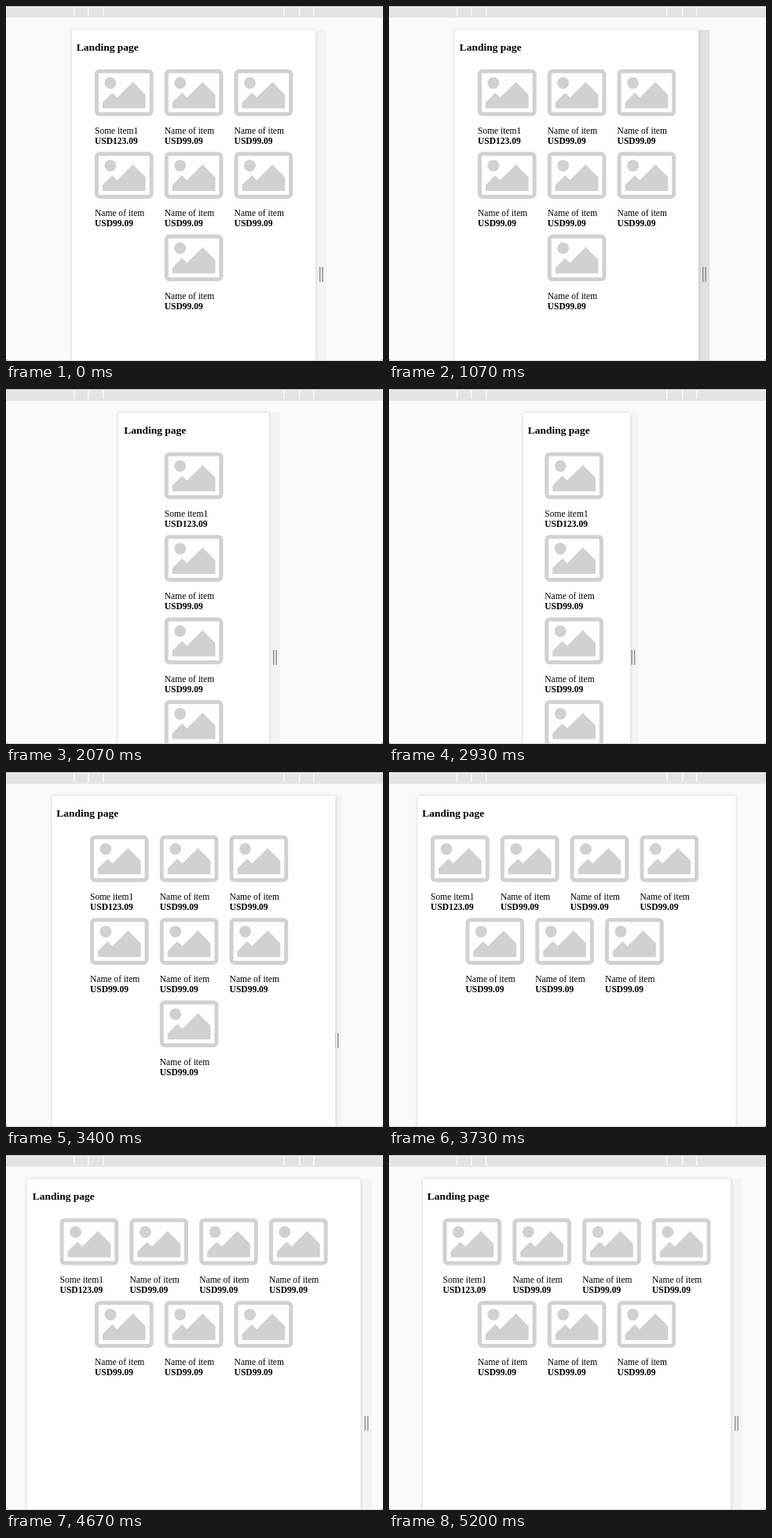
An HTML page with a canvas that plays this animation: 480x453 px, repeating every 5870 ms.

```html
<!DOCTYPE html>
<html lang="en">
<head>
<meta charset="utf-8">
<title>Responsive landing page</title>
<style>
  html, body { margin: 0; width: 100%; height: 100%; overflow: hidden; background: #faf9fb; }
  canvas { display: block; }
</style>
</head>
<body>
<canvas id="stage" width="480" height="453"></canvas>
<script>
const ctx = document.getElementById('stage').getContext('2d');
const STAGE_W = 480, STAGE_H = 453;
const LOOP = 5870, STEP = 1000 / 15;
const CENTER = 239, PAGE_TOP = 30.5;
const BODY_MARGIN = 5.8, CELL_W = 88.8, ROW_H = 105.4, ITEM_COUNT = 7;
const SERIF = '"Liberation Serif", "Times New Roman", serif';

// Page width while the handle is dragged: [step, width]
const DRAG = [
  [21, 310], [22, 304], [24, 284], [30, 205], [31, 192], [32, 176], [35, 118],
  [39, 118], [41, 121], [42, 124], [43, 129], [44, 136], [45, 152], [46, 186],
  [47, 236], [48, 290], [49, 326], [50, 349], [51, 361], [52, 362],
  [54, 362], [55, 374], [56, 405], [57, 437], [58, 457],
  [67, 457], [68, 450], [72, 400], [73, 392]
];

function pageWidth(step) {
  const next = DRAG.findIndex(([s]) => s >= step);
  if (next === 0) return DRAG[0][1];
  if (next < 0) return DRAG[DRAG.length - 1][1];
  const [s0, w0] = DRAG[next - 1], [s1, w1] = DRAG[next];
  return w0 + (w1 - w0) * (step - s0) / (s1 - s0);
}

function rect(color, x, y, w, h) {
  ctx.fillStyle = color;
  ctx.fillRect(x, y, w, h);
}

function text(str, x, y, font) {
  ctx.fillStyle = '#000';
  ctx.font = `${font} ${SERIF}`;
  ctx.fillText(str, x, y);
}

function drawToolbar() {
  rect('#faf9fb', 0, 0, STAGE_W, STAGE_H);
  rect('#e4e3e6', 0, 2, STAGE_W, 13);
  rect('#b5b4b7', 0, 0, STAGE_W, 1);
  for (const x of [86, 104, 123, 353, 373, 391]) rect('#faf9fb', x, 2, 1.5, 11);
}

function drawHandle(right, hover) {
  rect(hover ? '#e0dfe2' : '#f4f3f5', right, PAGE_TOP, 14, STAGE_H);
  for (const dx of [5, 8.5]) rect('#8b8a8d', right + dx, 333, 1.4, 19);
}

function drawPage(left, width) {
  ctx.save();
  ctx.shadowColor = 'rgba(0, 0, 0, 0.16)';
  ctx.shadowBlur = 4;
  ctx.fillStyle = '#fefefe';
  ctx.beginPath();
  ctx.roundRect(left, PAGE_TOP, width, STAGE_H, 2);
  ctx.fill();
  ctx.restore();
}

function drawPicture(x, y) {
  ctx.save();
  ctx.translate(x, y);
  ctx.scale(0.995, 0.995);
  ctx.strokeStyle = ctx.fillStyle = '#d1d0d3';
  ctx.lineWidth = 5;
  ctx.beginPath();
  ctx.roundRect(2.5, 2.5, 70, 55, 3.75);
  ctx.stroke();
  ctx.beginPath();
  ctx.arc(20, 17.5, 7.5, 0, Math.PI * 2);
  ctx.fill();
  ctx.beginPath();
  for (const [px, py] of [[10, 50], [10, 42.5], [22.5, 30], [28.75, 36.25], [48.75, 16.25], [65, 32.5], [65, 50]])
    ctx.lineTo(px, py);
  ctx.fill();
  ctx.restore();
}

function drawItems(left, width) {
  const cols = Math.max(1, Math.floor((width - 2 * BODY_MARGIN) / CELL_W));
  const middle = left + width / 2 + 0.2;
  for (let i = 0; i < ITEM_COUNT; i++) {
    const row = Math.floor(i / cols);
    const inRow = Math.min(cols, ITEM_COUNT - row * cols);
    const x = middle + (i % cols - inRow / 2) * CELL_W + 7;
    const y = 80.8 + row * ROW_H;
    drawPicture(x, y);
    text(i ? 'Name of item' : 'Some item1', x, y + 82.2, '11.52px');
    text(i ? 'USD99.09' : 'USD123.09', x, y + 95.2, 'bold 11.52px');
  }
}

function drawWindowCorners() {
  for (const x of [0, STAGE_W - 2]) rect('#b5b4b7', x, STAGE_H - 2, 2, 2);
  rect('#d8d7da', 0, STAGE_H - 1, STAGE_W, 1);
}

function draw(time) {
  const step = Math.floor((time % LOOP + 4) / STEP);
  const width = pageWidth(step);
  const change = width - pageWidth(step - 1);
  const left = CENTER - width / 2;

  // The layout and handle trail the page while it grows.
  const growth = Math.max(0, change);
  const inset = change < 0 ? 1.5 : 0;
  const layoutLeft = left + inset;
  const layoutWidth = width - growth - 2 * inset;

  drawToolbar();
  drawHandle(CENTER + (width - growth) / 2, step >= 16 && step < 22);
  drawPage(left, width);
  text('Landing page', layoutLeft + BODY_MARGIN, 57, 'bold 13.48px');
  drawItems(layoutLeft, layoutWidth);
  drawWindowCorners();
}

const start = performance.now();
function frame() {
  draw(performance.now() - start);
  requestAnimationFrame(frame);
}
frame();
</script>
</body>
</html>
```
